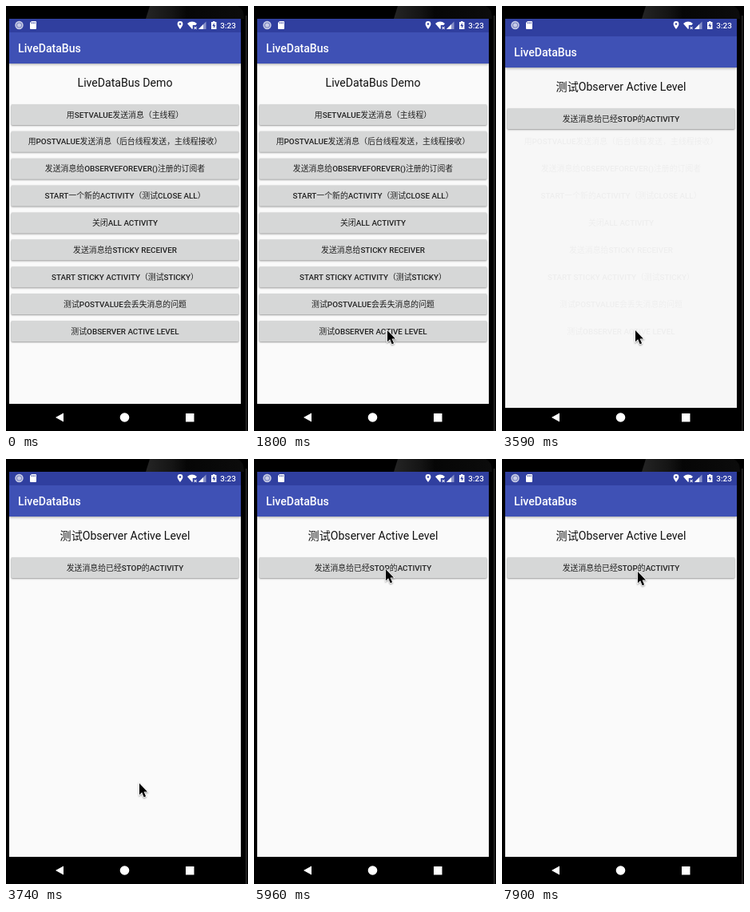
Animation, 303 px wide and 532 px high, one loop 8000 ms. Source, as an HTML page with a canvas:

```html
<!DOCTYPE html>
<html lang="zh">
<head>
<meta charset="utf-8">
<title>LiveDataBus Demo</title>
<style>
  html, body { margin: 0; width: 100%; height: 100%; overflow: hidden; background: #000; }
  canvas { display: block; width: 303px; height: 532px; }
</style>
</head>
<body>
<canvas id="stage" width="303" height="532"></canvas>
<script>
const ctx = document.getElementById('stage').getContext('2d');
const LOOP = 8000, SLIDE_START = 3590, SLIDE_END = 3740;
const FAMILY = 'Roboto, "Noto Sans CJK SC", "Noto Sans CJK", sans-serif';

const home = {
  heading: 'LiveDataBus Demo',
  buttons: [
    '用SETVALUE发送消息（主线程）',
    '用POSTVALUE发送消息（后台线程发送，主线程接收）',
    '发送消息给OBSERVEFOREVER()注册的订阅者',
    'START一个新的ACTIVITY（测试CLOSE ALL）',
    '关闭ALL ACTIVITY',
    '发送消息给STICKY RECEIVER',
    'START STICKY ACTIVITY（测试STICKY）',
    '测试POSTVALUE会丢失消息的问题',
    '测试OBSERVER ACTIVE LEVEL'
  ]
};
const detail = {
  heading: '测试Observer Active Level',
  buttons: ['发送消息给已经STOP的ACTIVITY']
};

// Pointer tip: [time, x, y], held until the next entry
const pointer = [
  [450, 130, 515], [600, 132, 497], [750, 137, 477], [900, 143, 458],
  [1200, 154.5, 438], [1350, 160, 424], [1500, 164, 414], [1650, 166, 408], [1800, 167, 406],
  [4480, 168, 310], [4630, 170, 236],
  [4930, 176, 196], [5070, 180, 160], [5220, 177, 150], [5370, 172, 143], [5520, 168, 139], [5660, 165, 138],
  [7300, 164, 150], [7450, 164, 168], [7600, 166, 177], [7750, 168, 158], [7900, 170, 141]
];

function rect(x, y, w, h, color) {
  ctx.fillStyle = color;
  ctx.fillRect(x, y, w, h);
}

function path(d, color) {
  ctx.fillStyle = color;
  ctx.fill(new Path2D(d));
}

function disc(x, y, r, color) {
  ctx.fillStyle = color;
  ctx.beginPath();
  ctx.arc(x, y, r, 0, Math.PI * 2);
  ctx.fill();
}

function text(str, x, y, size, weight, color, align = 'center') {
  ctx.font = `${weight} ${size}px ${FAMILY}`;
  ctx.textAlign = align;
  ctx.fillStyle = color;
  ctx.fillText(str, x, y);
}

function shadow(color, blur, dy) {
  ctx.shadowColor = color;
  ctx.shadowBlur = blur;
  ctx.shadowOffsetY = dy;
}

const rowY = i => 123 + i * 33.87;
const label = (str, i) => text(str, 149, rowY(i) + 16.6, 9.88, 500, '#212121');

function drawBody() {
  rect(0, 0, 303, 532, '#000');
  const gloss = ctx.createLinearGradient(176, 0, 303, 0);
  gloss.addColorStop(0, '#242424');
  gloss.addColorStop(0.25, '#151515');
  gloss.addColorStop(0.4, '#060606');
  gloss.addColorStop(1, '#0c0c0c');
  path('M180 0H290Q298 3 298 16H175Z', gloss);
  rect(300, 12, 1.5, 520, '#2b2b2b');
  path('M72 509.5V520.5L62 515Z', '#fff');
  disc(148.5, 515, 5.8, '#fff');
  rect(225, 510, 10.5, 10.5, '#fff');
}

function drawStatus(dy) {
  rect(4, 16, 290, 17 + dy, '#303f9f');
  disc(16.5, 24, 5.2, '#c9cde6');
  disc(16.5, 24, 3.6, '#7883c0');
  disc(16.5, 24, 2.5, '#c9cde6');
  path('M32 19H37Q38 19 38 20V28Q38 29 37 29H31Q30 29 30 28V21Z', '#fff');
  [32, 34, 36].forEach(x => rect(x - 0.2, 20.2, 0.9, 2, '#303f9f'));
  path('M218 29C215.8 26 214.6 24.4 214.6 22.5A3.4 3.4 0 0 1 221.4 22.5C221.4 24.4 220.2 26 218 29Z', '#fff');
  disc(218, 22.5, 1.2, '#303f9f');
  path('M227 22Q233 17.2 239 22L237.3 24H233.8V28.2L233 29Z', '#fff');
  text('×', 237, 29.5, 8, 700, '#fff');
  path('M241 29L250.5 19.5V29Z', '#8a93c8');
  path('M241 29L247 23V29Z', '#fff');
  path('M259 19H261.5V20H263.5V29H257V20H259Z', '#fff');
  path('M260.8 21L258.4 25H260V28L262.2 24H260.8Z', '#303f9f');
  text('3:23', 268.3, 27.7, 9.9, 500, '#fff', 'left');
}

function drawScreen(screen, dy) {
  rect(4, 33 + dy, 290, 465, dy ? '#f7f7f7' : '#fafafa');
  if (dy) {
    ctx.globalAlpha = 0.04;
    home.buttons.forEach((str, i) => i && label(str, i));
    ctx.globalAlpha = 1;
  }
  ctx.save();
  ctx.translate(0, dy);
  ctx.save();
  shadow('rgba(0,0,0,.35)', 3, 1);
  rect(4, 33, 290, 39, '#3f51b5');
  ctx.restore();
  text('LiveDataBus', 15, 58, 14.1, 500, '#fff', 'left');
  text(screen.heading, 149, 101, 14.1, 400, '#111');
  screen.buttons.forEach((str, i) => {
    ctx.save();
    shadow('rgba(0,0,0,.38)', 2, 1);
    ctx.fillStyle = '#d6d7d7';
    ctx.beginPath();
    ctx.roundRect(6.5, rowY(i), 285, 26, 1.4);
    ctx.fill();
    ctx.restore();
    label(str, i);
  });
  ctx.restore();
}

function drawPointer(t) {
  const spot = pointer.filter(p => p[0] <= t).pop();
  if (!spot) return;
  const arrow = new Path2D('M0 0V14.2L3.2 11.3L5.7 17.2L8.1 16.2L5.6 10.5H10Z');
  ctx.save();
  ctx.translate(spot[1], spot[2]);
  ctx.lineWidth = 1.6;
  ctx.strokeStyle = '#fff';
  shadow('rgba(0,0,0,.4)', 2, 1);
  ctx.stroke(arrow);
  shadow('transparent', 0, 0);
  ctx.fillStyle = '#000';
  ctx.fill(arrow);
  ctx.restore();
}

function draw(now) {
  const t = now % LOOP;
  const dy = t >= SLIDE_START && t < SLIDE_END ? 5 : 0;
  drawBody();
  ctx.save();
  ctx.beginPath();
  ctx.rect(4, 16, 290, 482 + dy);
  ctx.clip();
  drawScreen(t < SLIDE_START ? home : detail, dy);
  drawStatus(dy);
  ctx.restore();
  drawPointer(t);
}

const start = performance.now();
(function tick() {
  draw(performance.now() - start);
  requestAnimationFrame(tick);
})();
</script>
</body>
</html>
```
